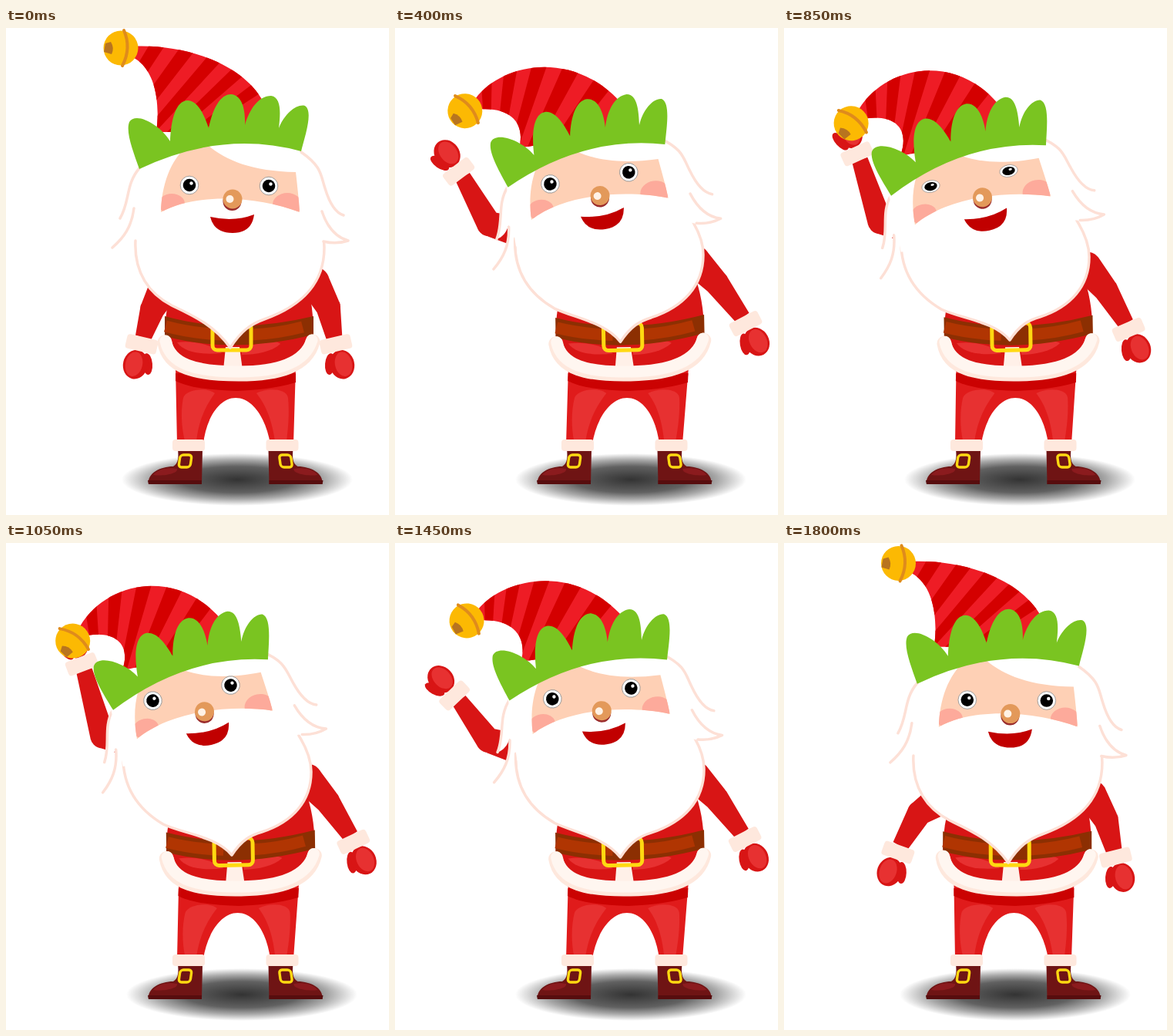
These frames come from a looping animation (497 px wide and 632 px high, 1850 ms). An HTML page:

```html
<!DOCTYPE html>
<html lang="en">
<head>
<meta charset="utf-8">
<title>Waving Santa</title>
<style>
html, body { margin: 0; width: 100%; height: 100%; overflow: hidden; background: #fff; }
svg { display: block; width: 497px; height: 632px; }
.line { fill: none; stroke: #fde0d6; stroke-width: 3.5; stroke-linecap: round; stroke-linejoin: round; }
.white { fill: #fff; }
.red { fill: #d81515; }
.lit { fill: #e73131; }
.fur { fill: #fee8dd; }
.gold { fill: none; stroke: #ffd911; }
</style>
</head>
<body>
<svg viewBox="0 0 497 632">
  <defs>
    <radialGradient id="shade">
      <stop offset="0" stop-opacity=".8"/>
      <stop offset=".5" stop-opacity=".62"/>
      <stop offset=".75" stop-opacity=".34"/>
      <stop offset="1" stop-opacity="0"/>
    </radialGradient>
    <clipPath id="hatClip"><path id="hatEdge"/></clipPath>
    <clipPath id="skinClip"><path id="skinShape" d="M201 239C202 205 212 172 238 150L262 152C285 172 320 186 376 187C378 205 380 222 381 239C330 220 250 212 201 239Z"/></clipPath>
    <g id="boot">
      <path fill="#6f1414" d="M223 547H255L254 592H185C183 578 200 569 217 569C224 565 224 556 223 547Z"/>
      <path fill="#8b1b1e" d="M191 580C198 571 212 570 222 572C224 578 205 582 191 580Z"/>
      <path fill="#570d0e" d="M184 587H254V592H185Z"/>
      <rect class="gold" x="225" y="554" width="15" height="16" rx="4" stroke-width="3.4" transform="translate(79) skewX(-8)"/>
      <rect class="fur" x="216" y="534" width="42" height="15" rx="4"/>
    </g>
    <g id="mitten">
      <ellipse class="red" cx="32" cy="-13" rx="14" ry="6.5" transform="rotate(-18 32 -13)"/>
      <ellipse class="red" cx="36" cy="2" rx="19" ry="16"/>
      <ellipse class="lit" cx="36" cy="4" rx="16" ry="11"/>
      <rect class="fur" x="-1" y="-20.5" width="19" height="41" rx="4"/>
    </g>
    <g id="eye">
      <circle r="11.8" fill="#fff" stroke="#888" stroke-width=".8"/>
      <circle r="8.3"/>
      <circle cx="2.5" cy="-2.5" r="2.2" fill="#fff"/>
    </g>
  </defs>

  <ellipse id="shadow" cx="300" cy="586" rx="150" ry="34" fill="url(#shade)"/>

  <g id="legs">
    <path fill="#e01b1b" d="M220 440L222 540H256C259 510 275 480 298 480C322 480 338 510 343 540H373L376 440Z"/>
    <path class="lit" d="M230 480C234 468 262 466 271 474C258 492 250 510 247 536H232C227 515 227 495 230 480Z"/>
    <path class="lit" d="M325 474C338 467 364 467 366 480C368 500 366 520 364 536H349C345 510 338 490 325 474Z"/>
    <path fill="#cb0202" d="M220 448H376V460C350 468 320 470 300 471C270 470 240 468 220 458Z"/>
  </g>
  <use href="#boot"/>
  <use href="#boot" transform="translate(595.5) scale(-1 1)"/>

  <g id="leftArm"><path class="red"/><use href="#mitten"/></g>
  <g id="rightArm"><path class="red"/><use href="#mitten"/></g>

  <g id="coat">
    <path class="red" d="M220 330C208 352 206 380 206 408C220 440 260 444 302 444C345 444 385 436 398 405C400 375 396 345 387 322Z"/>
    <path class="lit" d="M306 420C330 402 352 406 356 410C345 420 325 424 306 424Z"/>
    <path class="lit" d="M222 408C245 405 268 412 280 422C255 424 232 422 222 408Z"/>
    <path fill="#8c2f02" d="M206 374Q296 399 399 374V398Q296 424 206 400Z"/>
    <path d="M207 387Q240 396 280 398M318 398Q350 397 385 388" fill="none" stroke="#b03502" stroke-width="15"/>
    <path d="M285 414H303L307 444H282Z" fill="#fff0e8"/>
    <path d="M206 408C211 440 245 449 302 449C355 449 390 438 398 407" fill="none" stroke="#fee8dd" stroke-width="19" stroke-linecap="round"/>
    <path d="M207 406C213 436 245 446 302 446C355 446 388 434 397 405" fill="none" stroke="#fff6f0" stroke-width="15" stroke-linecap="round"/>
    <rect class="gold" x="268" y="383" width="50" height="35" rx="6" stroke-width="5"/>
  </g>

  <g id="leftHair">
    <path class="white" d="M185 165C156 190 160 222 148 247C156 246 162 240 166 232C163 258 153 272 138 285C152 284 164 278 172 272L215 290L230 170Z"/>
    <path class="line" d="M173 182C155 203 161 225 148 247M166 234C163 258 153 272 138 285"/>
  </g>
  <path id="beard" class="white"/>
  <path id="beardLine" class="line"/>
  <g id="face">
    <path class="white" d="M370 155C400 180 412 185 415 205C418 225 428 240 438 243C428 245 418 242 409 238C418 262 430 272 445 277C430 282 415 280 405 275L370 260Z"/>
    <path class="line" d="M383 161C410 180 408 190 414 208C420 228 428 240 438 243M410 238C418 262 430 272 444 276C432 280 420 279 412 277"/>
    <path class="white" d="M176 185Q280 135 381 160L400 270H176Z"/>
    <use href="#skinShape" fill="#fed0b5"/>
    <g clip-path="url(#skinClip)" fill="#fdaa9b">
      <ellipse cx="215" cy="228" rx="17" ry="13"/>
      <ellipse cx="365" cy="229" rx="19" ry="15"/>
    </g>
    <circle cx="293.5" cy="225" r="12" fill="#9a2c2c"/>
    <circle cx="294" cy="222" r="12.5" fill="#e3995a"/>
    <circle cx="290.5" cy="222" r="5" fill="#fff2e6"/>
    <path fill="#c10000" d="M265 245Q296 252 322 242Q319 266 294 266Q270 266 265 245Z"/>
  </g>
  <use class="eye" href="#eye"/>
  <use class="eye" href="#eye"/>

  <path id="hat" fill="#ee1c25"/>
  <path id="stripes" fill="#d40000" clip-path="url(#hatClip)"/>
  <path id="trim" fill="#7ac421" d="M173 183C165 160 155 135 160 122C168 108 200 125 213 147C214 120 220 94 236 94C250 95 258 115 263 130C268 105 278 86 292 86C306 87 311 105 310 126C316 105 328 88 344 88C358 90 356 112 354 130C362 110 378 98 388 101C399 108 388 140 383 160Q280 132 173 183Z"/>
  <g id="bell">
    <circle r="22.5" fill="#fcb903"/>
    <path d="M-2 -23Q-14 0 -4 23" fill="none" stroke="#df8b1c" stroke-width="4" stroke-linecap="round"/>
    <path d="M22 -5L12 -8Q8 0 13 8L20 6Z" fill="#b8741f"/>
  </g>
</svg>
<script>
const LOOP = 1850, STEP = 50;
const MIDDLE = 912;   // the motion plays forward, then mirrors here
const RISE = 590;     // time to reach the raised pose
const $ = id => document.getElementById(id);
const put = (el, name, value) => el.setAttribute(name, value);
const clamp = x => Math.max(0, Math.min(1, x));
const ease = x => (1 - Math.cos(Math.PI * x)) / 2;
const mix = (a, b, k) => a.map((v, i) => v + (b[i] - v) * k);

// Parabola through pose a at 0, b at mid and c at 1.
const arc = (k, mid, [a, b, c]) => a.map((v, i) =>
  v * (k - mid) * (k - 1) / mid
  + b[i] * k * (k - 1) / (mid * (mid - 1))
  + c[i] * k * (k - mid) / (1 - mid));

function polar([x, y], deg, along, across = 0) {
  const a = deg * Math.PI / 180, c = Math.cos(a), s = Math.sin(a);
  return [x + along * c - across * s, y + along * s + across * c];
}

const heading = (a, b) => Math.atan2(b[1] - a[1], b[0] - a[0]) * 180 / Math.PI;

// Arm poses: wrist, elbow, shoulder, hand angle
const LEFT = [
  [178, 402, 190, 365, 204, 340, 103],
  [66, 266, 120, 270, 172, 288, 190],
  [108, 153, 127, 249, 165, 255, 256]
];
const RIGHT = [
  [426, 402, 418, 362, 400, 330, 77],
  [454, 373, 417, 327, 388, 299, 61]
];

// Bell x, y, angle, then the two handles of the hat's upper edge
const HAT = [
  [149, 26, 180, 240, 22, 310, 50],
  [109, 70, 160, 170, 38, 255, 28],
  [86, 134, 118, 130, 50, 220, 35]
];
const HAT_INNER = [[200, 100, 195, 55], [160, 135, 140, 118]];

const BEARD = [
  [168, 276, 166, 318, 186, 345, 215, 360, 240, 372, 270, 385, 291, 415,
    305, 393, 318, 384, 335, 378, 380, 362, 413, 335, 413, 285, 413, 272, 410, 262, 406, 254],
  [152, 272, 150, 318, 172, 346, 204, 365, 232, 378, 272, 380, 293, 405,
    306, 385, 318, 379, 332, 375, 372, 362, 396, 335, 396, 297, 396, 280, 390, 266, 380, 250]
];

const ball = ([x, y], r) => `M${x - r} ${y}a${r} ${r} 0 1 0 ${2 * r} 0a${r} ${r} 0 1 0 ${-2 * r} 0Z`;

function taper(a, ra, b, rb) {
  const dir = heading(a, b);
  return 'M' + [polar(a, dir, 0, ra), polar(b, dir, 0, rb),
    polar(b, dir, 0, -rb), polar(a, dir, 0, -ra)].join('L') + 'Z';
}

function drawArm(id, pose, side) {
  const [limb, hand] = $(id).children;
  const wrist = pose.slice(0, 2), elbow = pose.slice(2, 4), shoulder = pose.slice(4, 6);
  put(limb, 'd', taper(wrist, 10.5, elbow, 16) + taper(elbow, 16, shoulder, 20)
    + ball(elbow, 16) + ball(shoulder, 20));
  put(hand, 'transform', `translate(${wrist}) rotate(${pose[6]}) scale(1 ${side})`);
}

// Point on a cubic curve, with the direction there
function onCurve(p, t) {
  const [a, b, c] = [0, 1, 2].map(i => mix(p[i], p[i + 1], t));
  const d = mix(a, b, t), e = mix(b, c, t);
  return { at: mix(d, e, t), dir: heading(d, e) };
}

function drawHat(curl, onHead) {
  const [bx, by, turn, ...handles] = arc(curl, .42, HAT);
  const bell = [bx, by], neck = turn - 165;
  const top = [polar(bell, neck, 20, -8), handles.slice(0, 2), handles.slice(2), onHead(334, 96)];
  const d = `M${top[0]}C${top.slice(1).join(' ')}L${onHead(340, 135)}L${onHead(195, 135)}`
    + `C${mix(...HAT_INNER, curl)} ${polar(bell, neck, 20, 8)}Z`;
  put($('hat'), 'd', d);
  put($('hatEdge'), 'd', d);

  const chord = heading(top[0], top[3]);
  let bands = '';
  for (let s = .07; s < .95; s += .19) {
    const [p, q] = [s, s + .095].map(u => {
      const { at, dir } = onCurve(top, u);
      const across = (dir + chord) / 2 + 108;
      return [polar(at, across, -6), polar(at, across, 130)];
    });
    bands += `M${p[0]}L${q[0]}L${q[1]}L${p[1]}Z`;
  }
  put($('stripes'), 'd', bands);
  put($('bell'), 'transform', `translate(${bell}) rotate(${turn})`);
}

function drawBeard(lean) {
  const [x, y, ...rest] = mix(...BEARD, lean);
  const edge = `M${x} ${y}C${rest}`;
  put($('beardLine'), 'd', edge);
  put($('beard'), 'd', edge + 'L290 200L180 230Z');
}

function draw(t) {
  const time = MIDDLE - Math.abs(t - MIDDLE);
  const rise = clamp(time / RISE);
  const lean = ease(rise);                                    // head and hat
  const lift = 1 - (1 - rise) ** 2;                           // arms lead the head
  const dip = ease(clamp((time - RISE) / (MIDDLE - RISE)));   // bob while waving
  const follow = lift - .4 * dip;
  const sway = 5 * follow;
  const tilt = -11.8 * lean;

  const nose = [294 - 36.5 * lean, 222 - 5 * lift + 3 * dip];
  // Hat and left hair slide down a little as the head tilts.
  const crown = [nose[0] + 8 * lean, nose[1] + 11.4 * lean];
  const pin = at => `translate(${at}) rotate(${tilt}) translate(-294 -222)`;
  put($('face'), 'transform', pin(nose));
  put($('leftHair'), 'transform', pin(crown));
  put($('trim'), 'transform', pin(crown));
  drawBeard(lean);
  drawHat(lean - .1 * dip, (x, y) => polar(crown, tilt, x - 294, y - 222));

  // Eyes drift towards the waving hand.
  const gaze = [nose[0] - 8.5 * lean, nose[1] - 8 * lean];
  const open = Math.min(1, .1 + Math.abs(t - 900) / 90);
  document.querySelectorAll('.eye').forEach((eye, i) => {
    const at = polar(gaze, tilt, i ? 47 : -56, i ? -17 : -18);
    put(eye, 'transform', `translate(${at}) rotate(${tilt}) scale(1 ${open})`);
  });

  put($('coat'), 'transform', `translate(${sway * .8}) rotate(${-sway * .25} 302 450)`);
  put($('legs'), 'transform', `matrix(1 0 ${-sway / 90} 1 ${sway * 6} 0)`);
  put($('shadow'), 'transform', `translate(${6 * Math.min(1, lean * 2.4)})`);
  drawArm('leftArm', arc(lift - .05 * dip, .68, LEFT), 1);
  drawArm('rightArm', mix(...RIGHT, follow), -1);
}

const start = performance.now();
function tick() {
  const t = (performance.now() - start) % LOOP;
  draw(Math.floor(t / STEP) * STEP);
  requestAnimationFrame(tick);
}
tick();
</script>
</body>
</html>
```
